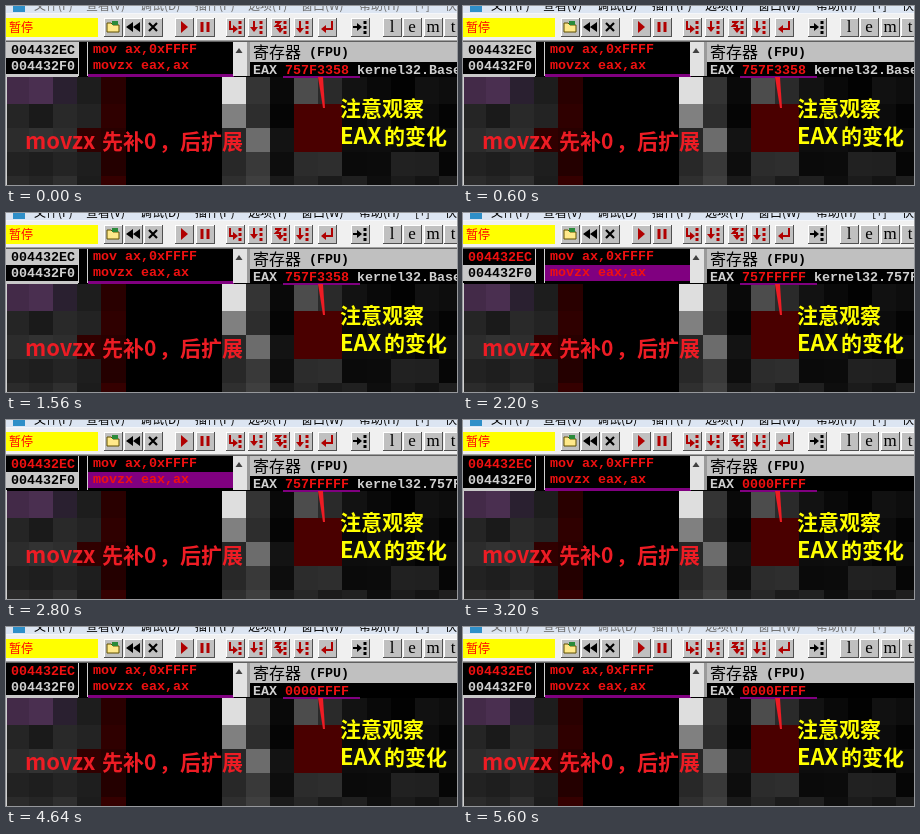
These frames come from a looping animation (451x179 px, 5800 ms). An HTML page:

```html
<!DOCTYPE html>
<html lang="zh">
<head>
<meta charset="utf-8">
<style>
html, body { margin: 0; width: 100%; height: 100%; overflow: hidden; background: #000; }
svg { display: block; width: 451px; height: 179px; }
text { white-space: pre; }
.code { font: bold 13.333px "Liberation Mono", monospace; }
.menu { font: 12px "Noto Sans CJK SC", "Noto Sans CJK", sans-serif; }
.song { font: 16px "Noto Sans CJK SC", "Noto Sans CJK", sans-serif; }
.note { font: bold 21px "Noto Sans CJK SC", "Noto Sans CJK", sans-serif; }
.latin { font: bold 22px "Noto Sans CJK SC", "Noto Sans CJK", sans-serif; }
.letter { font: 17px "Liberation Serif", serif; text-anchor: middle; }
</style>
</head>
<body>
<svg id="stage" viewBox="0 0 451 179"></svg>
<script>
const LOOP = 5800;
const FOCUS = 600, STEP_1 = 2200, STEP_2 = 3200, BLUR = 5600;
const stage = document.getElementById('stage');

function add(tag, attrs, content = '') {
  const el = document.createElementNS('http://www.w3.org/2000/svg', tag);
  for (const key in attrs) el.setAttribute(key, attrs[key]);
  el.textContent = content;
  return stage.appendChild(el);
}
const rect = (x, y, width, height, fill) =>
  add('rect', { x, y, width, height, fill, 'shape-rendering': 'crispEdges' });
const path = (d, stroke, width = 1, fill = 'none') =>
  add('path', { d, stroke, 'stroke-width': width, fill });
const text = (kind, x, y, fill, content) => add('text', { class: kind, x, y, fill }, content);

// Visible only inside the given [start, end) spans, with hard cuts.
function during(el, ...spans) {
  const on = t => spans.some(([a, b]) => t >= a && t < b) ? 1 : 0;
  const frames = [0, FOCUS, STEP_1, STEP_2, BLUR].map(t =>
    ({ opacity: on(t), offset: t / LOOP, easing: 'step-end' }));
  frames.push({ opacity: on(BLUR), offset: 1 });
  el.animate(frames, { duration: LOOP, iterations: Infinity });
}

function drawMosaic() {
  const size = 24.1, top = 73.5;
  const noise = (c, r) => { const v = Math.sin(c * 12.9 + r * 78.2) * 4375.8; return v - Math.floor(v); };
  const grey = v => `rgb(${Math.round(v)},${Math.round(v)},${Math.round(v)})`;
  const edgeX = c => Math.max(0, Math.round(c * size - 1));
  const edgeY = r => r ? Math.round(top + r * size) : 71;
  const tile = (c, r, fill) =>
    rect(edgeX(c), edgeY(r), edgeX(c + 1) - edgeX(c), edgeY(r + 1) - edgeY(r), fill);

  rect(0, 70, 451, 109, '#000');
  for (let r = 0; r < 5; r++) {
    for (let c = 0; c < 19; c++) {
      const n = noise(c, r);
      let fill = '#000';
      if (c < 4) fill = grey(24 + n * 26);
      else if (c === 4) fill = `rgb(${Math.round(36 + n * 24)},0,0)`;
      else if (c === 9 || c === 10) fill = grey(36 + n * 40);
      else if (c === 11) fill = grey(4 + n * 28);
      else if (c === 12 || c === 13) fill = r === 1 || r === 2 ? '#4a0000' : grey(26 + n * 26);
      else if (c > 13) fill = grey(n * (r < 3 ? 18 : 36));
      tile(c, r, fill);
    }
  }
  tile(0, 0, '#432a48');
  tile(1, 0, '#4a2f50');
  tile(2, 0, '#2a2030');
  tile(3, 2, '#300000');
  tile(9, 0, '#dedede');
  tile(9, 1, '#808080');
  tile(10, 2, '#6c6c6c');
  tile(12, 0, '#4c4c4c');
  rect(0, 70, 1, 109, '#d0d0d0');
}

function drawMenu() {
  rect(0, 0, 451, 8, '#dce5f2');
  rect(0, 7, 451, 1, '#f4f6fa');
  rect(7, 0, 12, 6, '#2f8fc8');
  const labels = ['文件(F)', '查看(V)', '调试(D)', '插件(P)', '选项(T)', '窗口(W)', '帮助(H)', '[+]', '快'];
  const lefts = [28, 80, 134, 189, 242, 295, 353, 409, 439];
  labels.forEach((label, i) => {
    during(text('menu', lefts[i], 4, '#6d6d6d', label), [0, FOCUS], [BLUR, LOOP]);
    during(text('menu', lefts[i], 4, '#000', label), [FOCUS, BLUR]);
  });
}

function drawButton(x) {
  rect(x, 12, 19, 19, '#505050');
  rect(x, 12, 18, 18, '#fff');
  rect(x + 1, 13, 17, 17, '#c0c0c0');
}

function drawToolbar() {
  rect(0, 8, 451, 28, '#f0f0f0');
  rect(0, 12, 92, 19, '#ff0');
  text('menu', 3, 26, '#f00', '暂停');

  const red = '#b00000', black = '#000';
  const icon = (left, ...strokes) => {
    drawButton(left);
    for (const [d, stroke, width, fill] of strokes)
      path(d, stroke, width, fill).setAttribute('transform', `translate(${left + 9} 21)`);
  };
  const solid = (d, fill) => [d, 'none', 0, fill];
  const dots = (x, color) => [`M${x}-6v3m0 2v3m0 2v3`, color, 3];

  icon(98, ['M-6 5v-9h4l2 2h6v7z', '#605000', 1, '#ffe98a'], solid('M-1-6h6v4h-6z', '#2a8a3a'));
  icon(118, solid('M0-5v10l-7-5zM7-5v10l-7-5z', black));
  icon(138, ['M-4-4l8 8m0-8l-8 8', black, 2.2]);
  icon(169, solid('M-3-6v12l7-6z', red));
  icon(190, ['M-3-5v10m6-10v10', red, 3]);
  icon(220, ['M-5-6v8h4', red, 2], solid('M-2-2v8l5-4z', red), dots(5, red));
  icon(242, ['M-3-6v7', red, 2], solid('M-7 0h8l-4 5z', red), dots(4, red));
  icon(265, ['M-5-5h5l-4 4h4v3', red, 2], solid('M-4 1h8l-4 5z', red), dots(5, red));
  icon(288, ['M-3-6v8', red, 2], solid('M-7 1h8l-4 5z', red), dots(4, red));
  icon(312, ['M5-6v8h-6', red, 2], solid('M-1-2v8l-5-4z', red));
  icon(345, ['M-7 0h6', black, 2], solid('M-3-4v8l5-4z', black), dots(5, black));

  [...'lemt'].forEach((letter, i) => {
    const x = Math.round(377 + i * 20.3);
    drawButton(x);
    text('letter', x + 9, 26, '#000', letter);
  });
  rect(0, 34, 451, 1, '#a0a0a0');
  rect(0, 35, 451, 1, '#606060');
}

function drawCode() {
  const white = '#d0d0d0', red = '#f01010', light = '#c8c8c8';
  rect(0, 36, 240, 34, '#000');

  const select = (y, height, ...spans) => {
    during(rect(0, y, 72, height, light), ...spans);
    during(rect(82, y, 146, height, '#800080'), ...spans);
  };
  select(68, 3, [0, STEP_1], [STEP_2, LOOP]);
  select(52, 16, [STEP_1, STEP_2]);
  during(rect(0, 36, 72, 16, light), [0, STEP_1]);
  rect(72, 36, 1, 34, white);
  rect(81, 36, 1, 34, white);

  const address = (y, fill, label, ...spans) => during(text('code', 5, y, fill, label), ...spans);
  address(48, '#000', '004432EC', [0, STEP_1]);
  address(48, red, '004432EC', [STEP_1, LOOP]);
  address(64, '#000', '004432F0', [STEP_1, STEP_2]);
  address(64, white, '004432F0', [0, STEP_1], [STEP_2, LOOP]);
  text('code', 87, 47, red, 'mov ax,0xFFFF');
  text('code', 87, 63, red, 'movzx eax,ax');

  rect(227, 36, 14, 34, '#e2e2e2');
  path('M229.5 47l3.5-5l3.5 5z', 'none', 0, '#404040');
  rect(241, 36, 3, 34, '#9a9a9a');
}

function drawRegisters() {
  rect(244, 36, 207, 20, '#c0c0c0');
  text('song', 247, 52, '#000', '寄存器');
  text('code', 303, 50, '#000', '(FPU)');
  rect(244, 56, 207, 14, '#000');
  text('code', 247, 68, '#d0d0d0', 'EAX');
  const value = (start, end, number, symbol) => {
    during(text('code', 279, 68, '#f01010', number), [start, end]);
    during(text('code', 351, 68, '#d0d0d0', symbol), [start, end]);
  };
  value(0, STEP_1, '757F3358', 'kernel32.Base');
  value(STEP_1, STEP_2, '757FFFFF', 'kernel32.757F');
  value(STEP_2, LOOP, '0000FFFF', '');
}

function drawNotes() {
  const red = '#ed1c24', yellow = '#ff0';
  rect(277, 70, 77, 2, '#800080');
  path('M312 71h5l2 31h-2z', 'none', 0, red);
  text('latin', 19, 143, red, 'movzx');
  text('note', 96, 143, red, '先补0');
  text('note', 153, 143, red, '，后扩展');
  text('note', 334, 110, yellow, '注意观察');
  text('latin', 334, 138, yellow, 'EAX');
  text('note', 378, 138, yellow, '的变化');
}

[drawMosaic, drawToolbar, drawMenu, drawCode, drawRegisters, drawNotes].forEach(draw => draw());
</script>
</body>
</html>
```
